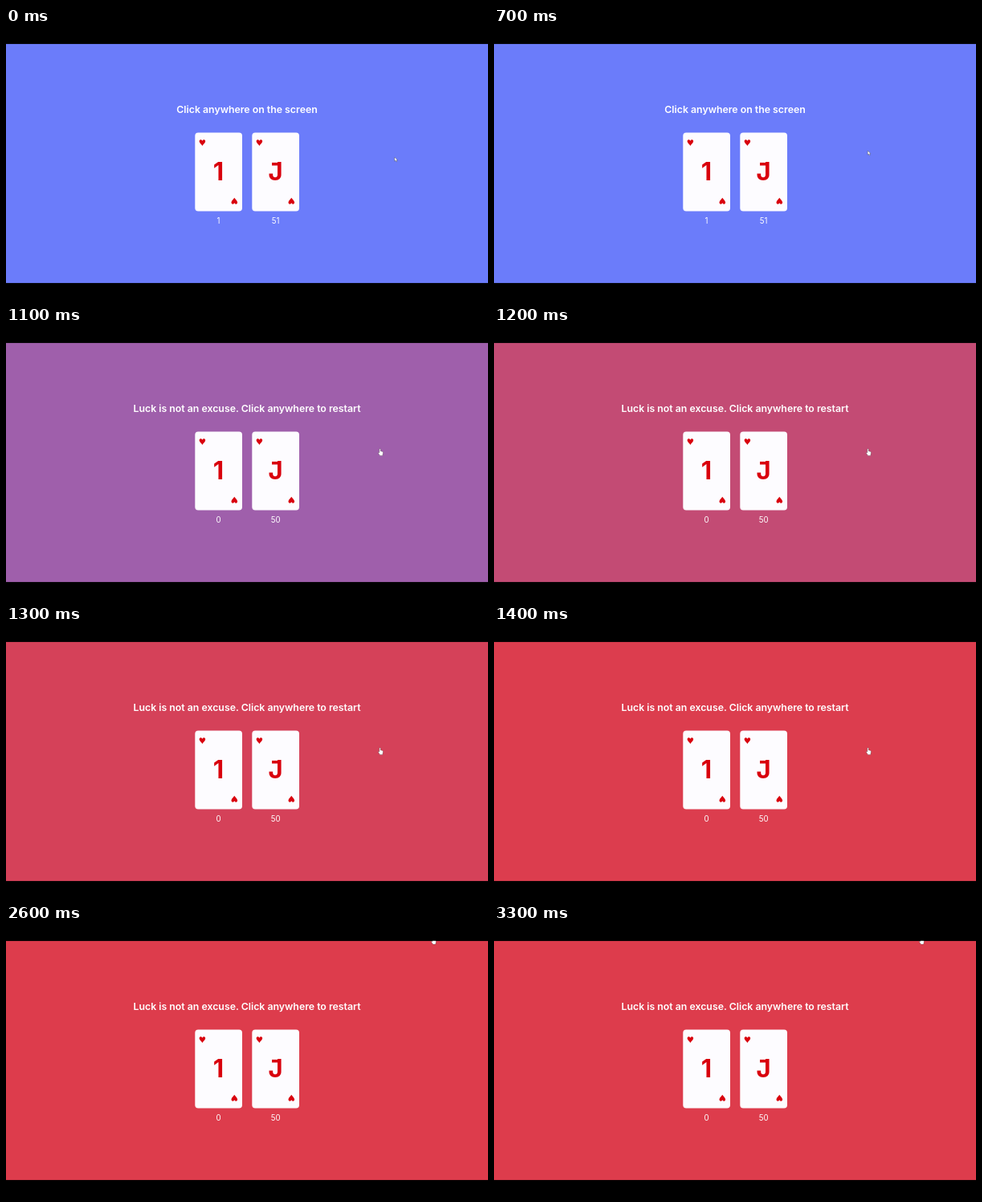
These frames come from a looping animation (600 px wide and 338 px high, 3.4 s). An HTML page:

```html
<!DOCTYPE html>
<html lang="en">
<head>
<meta charset="utf-8">
<style>
  html, body { margin: 0; width: 100%; height: 100%; overflow: hidden; background: #000; }
  svg { display: block; width: 100vw; height: 100vh; }
  text { font-family: Inter, "Open Sans", sans-serif; text-anchor: middle; fill: #fff; }
  .heading { font-size: 12.3px; font-weight: 600; }
  .rank { font-size: 31px; font-weight: 700; }
  .count { font-size: 9.7px; }
  .card { fill: #fdfcff; }
  .red, .rank { fill: #d9000d; }
</style>
</head>
<body>
<svg viewBox="0 0 600 338">
  <defs>
    <path id="heart" class="red" d="M0 4C-.9 2.2-3.8.5-3.8-1.7C-3.8-4.3-.8-4.6 0-2.2C.8-4.6 3.8-4.3 3.8-1.7C3.8.5.9 2.2 0 4Z"/>
    <g id="card">
      <rect class="card" width="58.7" height="98" rx="4"/>
      <use href="#heart" x="9.1" y="12.5"/>
      <use href="#heart" transform="translate(49 85.3) rotate(180)"/>
    </g>
  </defs>
  <rect id="table" y="19.7" width="600" height="298.6"/>
  <text id="heading" class="heading" x="300" y="105.8"></text>
  <use href="#card" x="235.3" y="130.5"/>
  <use href="#card" x="306.3" y="130.5"/>
  <text class="rank" x="264.4" y="190.4">1</text>
  <text class="rank" x="335.5" y="190.4">J</text>
  <rect class="red" x="331" y="167.9" width="8" height="3.6"/>
  <text id="left" class="count" x="264.5" y="244.3"></text>
  <text id="right" class="count" x="335.7" y="244.3"></text>
  <path id="arrow" fill="#fff" stroke="#333" stroke-width=".35" d="M-1.3-3V2.1L-.1 1.1L.8 3L1.7 2.6L.9.8H2.4Z"/>
  <path id="hand" fill="#fff" stroke="#333" stroke-width=".3" d="M-1.7-3.8Q-1-4.9-.3-3.8V-1.3L2.2-.6Q3-.2 2.9.8L2.2 4.4H-1L-3.1 1.3Q-3.3.2-2.2.5L-1.7 1Z"/>
  <path d="M0 0H600V19.7H0ZM0 318.3H600V338H0Z"/>
</svg>
<script>
const LOOP = 3400, STEP = 100, CLICK = 965, FADE = 500;
const BLUE = [107, 124, 250], RED = [221, 60, 76];
const el = id => document.getElementById(id);
const clamp = v => Math.min(1, Math.max(0, v));
const mix = (a, b, k) => a.map((v, i) => v + (b[i] - v) * k);
const smooth = k => k * k * (3 - 2 * k);

// CSS "ease": cubic-bezier(.25, .1, .25, 1)
function ease(x) {
  const curve = (a, b, u) => 3 * a * u * (1 - u) ** 2 + 3 * b * u * u * (1 - u) + u ** 3;
  let low = 0, high = 1;
  for (let i = 0; i < 24; i++) {
    const mid = (low + high) / 2;
    if (curve(.25, .25, mid) < x) low = mid; else high = mid;
  }
  return curve(.1, 1, (low + high) / 2);
}

function pointer(t) {
  const start = [485, 164], rest = [466.5, 156], exit = [532.5, 19.7];
  return t < 1800
    ? mix(start, rest, smooth(clamp((t - 100) / 500)))
    : mix(rest, exit, smooth(clamp((t - 1800) / 500)));
}

function draw(time) {
  const t = Math.floor((time % LOOP) / STEP) * STEP;
  const over = t >= CLICK;
  const color = mix(BLUE, RED, ease(clamp((t - CLICK) / FADE)));
  el("table").setAttribute("fill", `rgb(${color.map(Math.round)})`);
  el("heading").textContent = over
    ? "Luck is not an excuse. Click anywhere to restart"
    : "Click anywhere on the screen";
  el("left").textContent = over ? 0 : 1;
  el("right").textContent = over ? 50 : 51;
  for (const id of ["arrow", "hand"]) {
    el(id).setAttribute("transform", `translate(${pointer(t)})`);
    el(id).setAttribute("visibility", (id === "hand") === over ? "visible" : "hidden");
  }
}

const began = performance.now();
function tick() {
  draw(performance.now() - began);
  requestAnimationFrame(tick);
}
tick();
</script>
</body>
</html>
```
